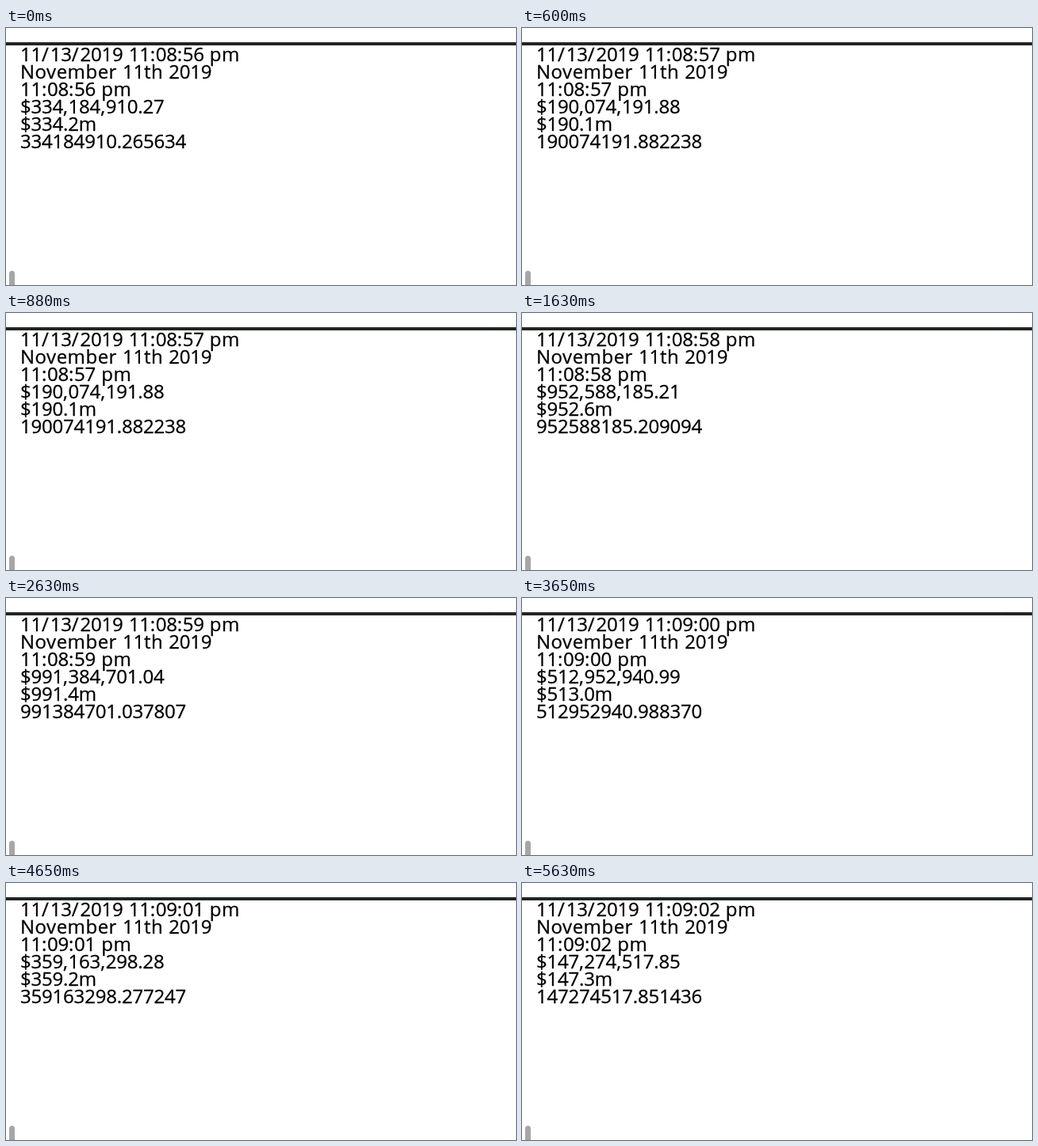
These frames come from a looping animation (643 by 325 pixels, 5700 ms). An HTML page:

```html
<!DOCTYPE html>
<html lang="en">
<head>
<meta charset="utf-8">
<title>Live formats</title>
<style>
  html, body { margin: 0; width: 100%; height: 100%; overflow: hidden; background: #fff; }
  svg { display: block; }
  text {
    font: 24px "Open Sans", "Noto Sans", sans-serif;
    letter-spacing: -.2px;
    word-spacing: 1px;
    white-space: pre;
    fill: #000;
    stroke: #000;
    stroke-width: .3px;
  }
  .word { letter-spacing: .5px; }
  .mark { letter-spacing: .6px; }
  .slash { letter-spacing: 1.9px; }
</style>
</head>
<body>
<svg width="643" height="325" viewBox="0 0 643 325">
  <rect y="18" width="643" height="4" fill="#212521"/>
  <path id="glint" d="M607 18h6l-3 3z" fill="#1a2030"/>
  <rect x="4" y="307" width="7" height="30" rx="3.5" fill="#a6a6a6"/>
  <g id="lines"></g>
</svg>
<script>
const LOOP = 5700;
const ticks = [
  [0, 334184910.265634],
  [600, 190074191.882238],
  [1630, 952588185.209094],
  [2630, 991384701.037807],
  [3650, 512952940.988370],
  [4650, 359163298.277247],
  [5630, 147274517.851436]
];
const NS = 'http://www.w3.org/2000/svg';
const glint = document.getElementById('glint');
const group = document.getElementById('lines');

function add(parent, tag, attrs) {
  const el = document.createElementNS(NS, tag);
  for (const key in attrs) el.setAttribute(key, attrs[key]);
  return parent.appendChild(el);
}

const rows = Array.from({ length: 6 }, (_, i) => add(group, 'text', { x: 18, y: 42 + 22 * i }));

function kindOf(part) {
  if (part === '/') return 'slash';
  if (/[,:]/.test(part)) return 'mark';
  return /[a-z]/i.test(part) ? 'word' : 'figure';
}

// Words and separators are set slightly wider than figures.
function setText(row, str) {
  row.textContent = '';
  for (const part of str.match(/[a-z]+|[\/,:]|[^a-z\/,:]+/gi)) {
    add(row, 'tspan', { class: kindOf(part) }).textContent = part;
  }
}

function clock(index) {
  const sec = 56 + index;
  const pad = n => String(n).padStart(2, '0');
  return `11:${pad(8 + Math.floor(sec / 60))}:${pad(sec % 60)} pm`;
}

function format(index) {
  const value = ticks[index][1];
  const time = clock(index);
  const money = value.toFixed(2).replace(/\B(?=(\d{3})+\.)/g, ',');
  return [
    '11/13/2019 ' + time,
    'November 11th 2019',
    time,
    '$' + money,
    '$' + (value / 1e6).toFixed(1) + 'm',
    value.toFixed(6)
  ];
}

let shown = -1;
function draw(t) {
  let index = ticks.length - 1;
  while (t < ticks[index][0]) index--;
  if (index !== shown) {
    format(index).forEach((str, i) => setText(rows[i], str));
    shown = index;
  }
  glint.setAttribute('visibility', t < 880 ? 'hidden' : 'visible');
}

const start = performance.now();
function frame() {
  draw((performance.now() - start) % LOOP);
  requestAnimationFrame(frame);
}
frame();
</script>
</body>
</html>
```
